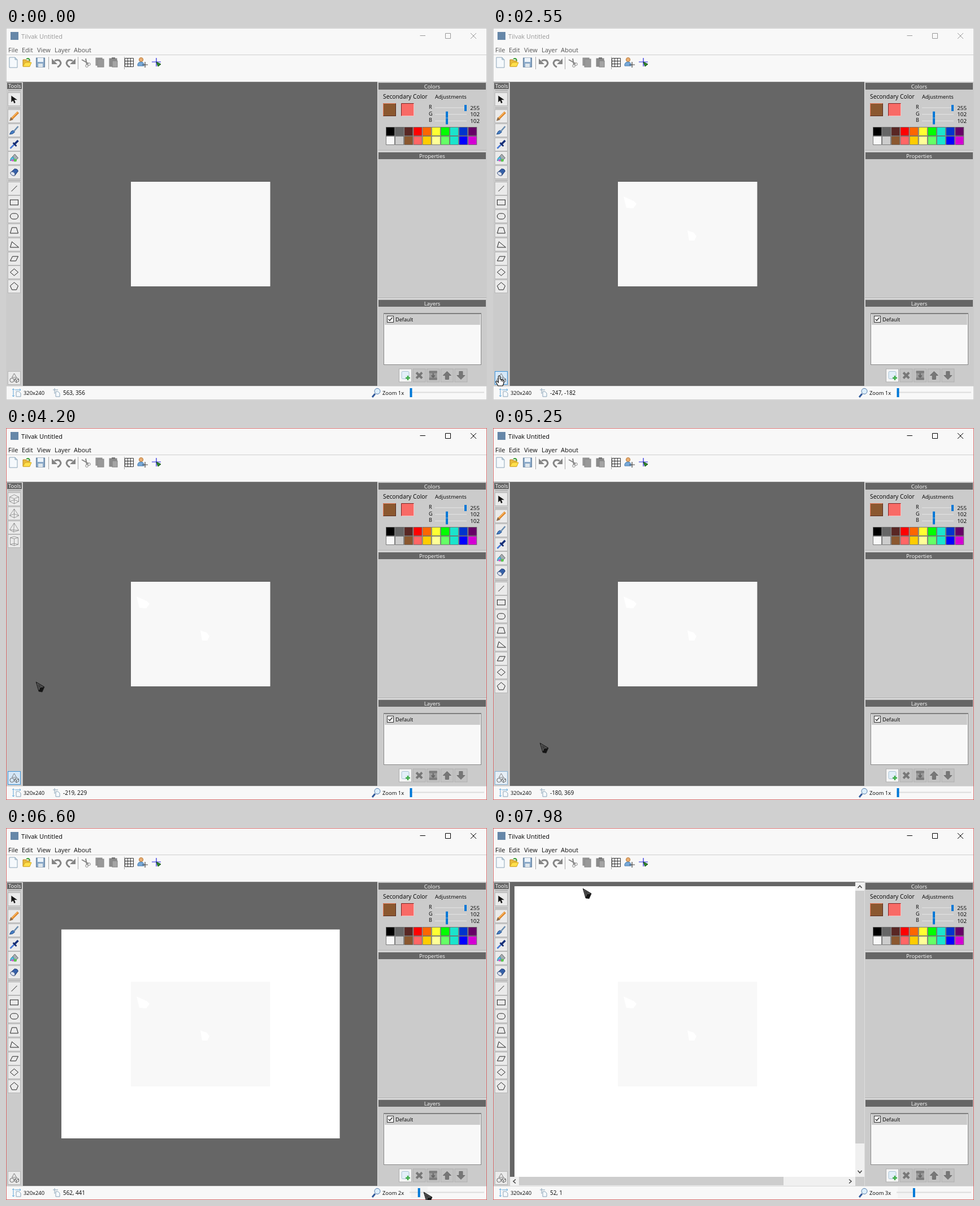
These frames come from a looping animation (851 by 658 pixels, 8 s). An HTML page:

```html
<!DOCTYPE html>
<html lang="en">
<head>
<meta charset="utf-8">
<title>Paint window</title>
<style>
html, body { margin: 0; width: 100%; height: 100%; overflow: hidden; background: #f8f8f8; }
svg { display: block; width: 851px; height: 658px; font-family: "Open Sans", "Noto Sans", sans-serif; }
text { white-space: pre; }
</style>
</head>
<body>
<svg id="stage" viewBox="0 0 851 658"></svg>
<script>
const R = (x, y, w, h, fill, stroke = 'none', extra = '') =>
  `<rect x="${x}" y="${y}" width="${w}" height="${h}" fill="${fill}" stroke="${stroke}" ${extra}/>`;
const P = (d, stroke = '#222', fill = 'none', w = 1) =>
  `<path d="${d}" stroke="${stroke}" fill="${fill}" stroke-width="${w}"/>`;
const C = (x, y, r, fill, stroke = 'none') =>
  `<circle cx="${x}" cy="${y}" r="${r}" fill="${fill}" stroke="${stroke}"/>`;
const T = (x, y, s, size = 9.5, fill = '#000', extra = '') =>
  `<text x="${x}" y="${y}" font-size="${size}" fill="${fill}" ${extra}>${s}</text>`;
const G = (x, y, body, extra = '') => `<g transform="translate(${x} ${y})" ${extra}>${body}</g>`;
const head = (y, s) => R(659, y, 190, 12, '#666') + T(754, y + 9.5, s, 9.5, '#fff', 'text-anchor="middle"');
const page = P('M-7-9H3L7-5V9H-7Z', '#8ba4b8', '#f5f9fc') + P('M3-9L7-5H3Z', '#8ba4b8', '#cfe0ec');
const grey = '#858585';

// Icons are drawn around their own centre
const bar = [
  [13, page],
  [37, P('M-7 7V-5H-2L0-3H5V7Z', '#b98a20', '#e9b93c') + P('M-7 7L-3 0H8L5 7Z', '#d9ac20', '#ffe04c') + P('M-1-6Q4-9 5-3', '#389b30', 'none', 2)],
  [61, R(-7.5, -8, 15, 16, '#8ba9c8', '#5f7b98') + R(-5, -8, 10, 7, '#eef4fa') + R(-4, 2, 8, 6, '#dfe6ec')],
  [90, P('M-4-3Q5-7 7 1Q6 6 1 8', grey, 'none', 3) + P('M-9-7V3H1Z', 'none', grey)],
  [114, P('M4-3Q-5-7-7 1Q-6 6-1 8', grey, 'none', 3) + P('M9-7V3H-1Z', 'none', grey)],
  [142, P('M-8-5L4 2M-1-7L1 4', grey, 'none', 2) + C(5, 3, 2.3, 'none', grey) + C(1, 6, 2.3, 'none', grey)],
  [166, R(-7, -8, 11, 13, '#9a9a9a', '#858585') + R(-4, -6, 11, 14, '#999', '#858585')],
  [190, R(-7, -7, 13, 14, '#8c8c8c', '#808080') + R(-3, -9, 6, 3, '#777') + R(-2, -3, 9, 11, '#a5a5a5', '#808080')],
  [218, P('M-7.5-7.5H7.5V7.5H-7.5ZM-2.5-7.5V7.5M2.5-7.5V7.5M-7.5-2.5H7.5M-7.5 2.5H7.5', '#333', '#fff')],
  [240, C(-1, -5, 3.6, '#e8ad72', '#b87838') + P('M-7 6V3Q-6-1-1-1Q3-1 4 3V6Z', '#4a7fb0', '#78a9d8') + P('M6-1V9M1 4H11', '#444', 'none', 1.2)],
  [266, P('M-8-1H8M0-8V7', '#2222e0', 'none', 1.2) + P('M0-1L8 3L3 7Z', '#174d17', '#2c8a2c')]
];
const line = d => P(d, '#222');
const pen = (tip, body) => P('M-8 8L-6 2L-2 6Z', tip, tip, .5) + P('M-4 4L7-7', body, 'none', 4);
const flat = [
  [126, P('M-5-6V5L-2 2L0 7L2 6L0 1H5Z', '#111', '#111', .3)],
  [156, pen('#8a6a48', '#d9822b') + P('M-4 3L6-7', '#ffbd62', 'none', 1.5)],
  [181, P('M-8 7Q-6 1-2 0L1 3Q-2 7-8 7Z', '#244e86', '#487fc4') + P('M0 1L7-7', '#6a8cae', 'none', 2.6)],
  [206, P('M-7 7L2-2', '#4877d4', 'none', 2.5) + P('M-2-3L4 3', '#13296b', 'none', 2.5) + P('M1-1L7-7', '#16307a', 'none', 3.6)],
  [230, P('M-5 0L1-7L7 0L0 6Z', '#666', '#a7adb2') + P('M-7 5Q-6-2-2-2L0 2Q-3 3-7 5Z', '#38a', '#55c5de') + C(-3, 4, 2, '#d457cf') + C(2, 4, 2.5, '#5bc64e')],
  [255, P('M-7 1L1-6Q6-6 7-2L1 6Q-5 7-7 1Z', '#233c72', '#3560a8') + P('M-7 1Q-5-2-1 0Q2 2 1 6Q-5 7-7 1Z', '#5d6f91', '#dfe5f2')],
  [284, line('M-5 5L5-5')],
  [308, R(-7, -4, 14, 9, 'none', '#222')],
  [333, R(-7, -5, 14, 10, 'none', '#222', 'rx="5"')],
  [358, line('M-7 5L-4-5H4L7 5Z')],
  [383, line('M-7 5L-4-5L8 5Z')],
  [408, line('M-7 4L-3-4H7L3 4Z')],
  [432, line('M0-6L7 0L0 6L-7 0Z')],
  [457, line('M0-7L7-1L4 6H-4L-7-1Z')]
];
const thin = d => P(d, '#777', 'none', .7);
const solid = [
  [126, thin('M-8-4L0-8L8-4V4L0 8L-8 4ZM-8-4L0-1L8-4M0-1V8M-8 4L0 1L8 4')],
  [151, thin('M0-8L8 4L0 8L-8 4ZM0-8V8M-8 4L0 1L8 4')],
  [176, thin('M0-8L8 5L-1 8L-8 4ZM0-8L-1 8M-8 4L8 5')],
  [200, thin('M-7-6L0-4L7-6V6L0 8L-7 6ZM-7-6L0-8L7-6M0-4V8M-7 6L0 4L7 6')]
];
const plain = '#eaeaea';
const button = ([y, icon]) => R(3.5, y - 11.5, 22, 23, plain, '#b8b8b8', `class="tool" data-y="${y}"`) + G(14.5, y, icon);
const swatches = [
  '#000 #666 #592724 #f00 #f60 #ff3 #0f0 #1be4cc #03c #606',
  '#f8f8f8 #ccc #8b5830 #f66 #fc0 #ff9 #6f6 #1be4cc #00f #d400d4'
].map((row, j) => row.split(' ').map((c, i) =>
  R(672.5 + i * 16.15, 175.5 + j * 16, 15, 15, c, '#666', 'stroke-width=".8"')).join('')).join('');
const level = ([name, value, x], i) => {
  const y = 140.5 + i * 11.7;
  return T(748, y + 2.5, name, 9) + R(759, y, 56, 1, '#e5e5e5') + R(x - 2, y - 4.5, 4, 11, '#0078d7')
    + T(838, y + 4, value, 9.8, '#000', 'text-anchor="end"');
};
const arrowUp = 'M0-7L7 0H3V7H-3V0H-7Z';
const layerIcons = [
  R(-6.5, -7, 13, 13, '#e3eff8', '#a9c4d6', 'rx="2"') + P('M4.5 .5V8.5M.5 4.5H8.5', '#3fae48', 'none', 2.6),
  P('M-5-5L5 5M5-5L-5 5', '#777', 'none', 4),
  R(-7, -8, 14, 16, '#999') + R(-7, -8, 14, 4, '#7c7c7c') + R(-7, 4, 14, 4, '#7c7c7c') + P('M0-4V3M-3 0L0 3L3 0', '#666', 'none', 2),
  P(arrowUp, '#6c6c6c', '#777'),
  P('M0 7L7 0H3V-7H-3V0H-7Z', '#6c6c6c', '#777')
].map((icon, i) => R(695.5 + i * 24.6, 603, 22, 23, i ? '#c3c3c3' : '#f5f5f5', '#b0b0b0') + G(706.5 + i * 24.6, 614.5, icon)).join('');
const chevron = (x, y, turn) => `<path transform="translate(${x} ${y}) rotate(${turn})" d="M-3.5 2L0-2L3.5 2" fill="none" stroke="#444" stroke-width="1.5"/>`;
const ghost = (x, y, id, d) => G(x, y, P(d, 'none', '#fff'), `id="${id}"`);

const stage = document.getElementById('stage');
stage.innerHTML =
  R(0, 0, 851, 658, '#f8f8f8')
  + R(8, 7, 14, 14, '#6687a8')
  + '<g id="title">' + T(27, 18.5, 'Tilvak Untitled', 11, 'currentColor')
  + P('M732.5 13.5H742M777.5 9.5H786.5V18.5H777.5ZM822 9L832 19M832 9L822 19', 'currentColor') + '</g>'
  + '<g id="menu">' + [[4, 'File'], [28, 'Edit'], [55, 'View'], [86, 'Layer'], [120, 'About']].map(([x, s]) => T(x, 42.5, s, 11, 'currentColor')).join('') + '</g>'
  + R(0, 47, 851, 1, '#cfcfcf') + [75, 127, 209].map(x => R(x, 51, 1, 22, '#aaa')).join('')
  + bar.map(([x, icon]) => G(x, 61, icon)).join('')
  // drawing area
  + R(29.5, 95, 628.5, 538, '#666') + R(221, 272, 246, 185, '#fff', 'none', 'id="sheet"') + R(221, 272, 246.3, 185, '#f8f8f8')
  + ghost(344, 358, 'mark1', 'M0 0L11 4L16 10L12 18L3 18Z')
  + ghost(231, 298, 'mark2', 'M0 0L18 8L23 13L17 21L5 20Z')
  + '<g id="scroll">' + R(641, 96, 16, 521, '#f0f0f0') + R(641, 111, 16, 447, '#cdcdcd')
  + R(30, 617, 612, 16, '#f0f0f0') + R(46, 617, 468, 15, '#cdcdcd') + R(641, 617, 16, 16, '#cbcbcb')
  + chevron(649, 104, 0) + chevron(649, 608, 180) + chevron(38, 625, -90) + chevron(632, 625, 90) + '</g>'
  // left tools
  + R(0, 95, 29.5, 538, '#cbcbcb') + R(28, 95, 1, 538, '#dedede') + R(0, 95, 658, 1, '#888')
  + R(2, 97, 26, 11, '#666') + T(4, 106, 'Tools', 9.3, '#fff') + R(4, 110, 22, 1, '#aaa')
  + '<g id="flat">' + flat.map(button).join('') + R(4, 141, 22, 1, '#aaa') + R(4, 269, 22, 1, '#aaa') + '</g>'
  + '<g id="solid">' + solid.map(button).join('') + '</g>'
  + R(3.5, 607.5, 22, 23, plain, '#b8b8b8', 'id="swap"')
  + G(14.5, 619, P('M0-8L4-1H-4Z', '#666', 'none', .8) + C(-4, 4, 3.6, 'none', '#666') + P('M1 2L5 0L8 2V6L4 8L1 6ZM1 2L4 4L8 2M4 4V8', '#555', 'none', .9))
  // right panels
  + R(658, 95, 193, 538, '#cbcbcb') + R(657, 95, 1, 538, '#dedede')
  + head(97, 'Colors') + head(220, 'Properties') + head(481, 'Layers')
  + [217, 478].map(y => R(658, y - 1, 192, 1, '#aaa') + R(658, y, 192, 1, '#eee')).join('')
  + T(667, 125, 'Secondary Color', 10.3) + T(759, 125, 'Adjustments', 9.5)
  + R(667.5, 133.5, 22, 22, '#8b5830', '#5a2c20') + P('M667.5 155.5V133.5H689.5', '#e57c5c')
  + R(699.5, 133.5, 22, 22, '#f86a66', '#fbb') + P('M699.5 155.5V133.5H721.5', '#7d2020')
  + [['R', 255, 813], ['G', 102, 780], ['B', 102, 780]].map(level).join('') + swatches
  + R(668.5, 504.5, 172, 91, '#f8f8f8', '#888') + R(670, 506, 169, 19, '#cbcbcb') + P('M669 505.5H840', '#777')
  + R(674.5, 509.5, 11, 11, '#fff', '#333') + P('M676.5 515L679 517.5L683.5 512', '#222', 'none', 1.3) + T(689, 518.5, 'Default', 9.2) + layerIcons
  // status bar
  + R(0, 633, 851, 25, '#f8f8f8') + R(0, 633, 851, 1, '#d8d8d8')
  + G(19, 645, P('M-6-7V7M-8-5L-6-7L-4-5M-8 5L-6 7L-4 5M-3-5H7M5-7L7-5L5-3', '#5aa4da') + P('M-1-2H4L7 1V7H-1Z', '#8ba4b8', '#f5f9fc'))
  + T(31, 648.5, '320x240', 9.4)
  + G(89, 645, P('M-6-5H3M-3-8V2', '#8ba4b8') + P('M-1-2H3L6 1V7H-1Z', '#8ba4b8', '#f5f9fc'))
  + T(101, 648.5, '', 9.9, '#000', 'id="coords"')
  + P('M648 653L653 647', '#315a9c', 'none', 3) + C(657, 642.5, 5, '#dceefb', '#527bab')
  + T(666, 648.5, '', 9.4, '#000', 'id="zoom"')
  + R(716, 635, 30, 20, '#f3f3f3', 'none', 'id="smear"') + R(714, 643.5, 132, 2, '#ddd') + R(714.5, 637, 4, 16, '#0078d7', 'none', 'id="thumb"')
  + R(.5, .5, 850, 657, 'none', '#ccc', 'id="frame"')
  + '<g id="arrow">' + P('M0 0L15 9L11 18L5 17Z', '#222', '#151515', .8) + P('M2 2.5L12.5 9L7 9.5L5.5 14Z', '#888', '#3c3c3c', .6) + '</g>'
  + '<g id="hand">' + P('M-1.5 10V1Q0-1 1.5 1V6L8 8Q9 13 6 18H-2L-6 11Q-5 8-1.5 12Z', '#111', '#fff', 1.2) + P('M3.5 7V10M5.8 8V11', '#111') + '</g>';

// Pointer path: step, x, y
const path = [
  [1, 344, 358], [2, 238, 302], [3, 231, 298], [5, 31, 132], [7, 18, 119], [8, 16, 125],
  [9, 15, 205], [11, 13, 300], [14, 12, 570], [17, 11, 614], [19, 11, 612], [21, 16, 300],
  [23, 14, 122], [25, 14, 200], [28, 53, 448], [30, 40, 520], [32, 12, 614], [33, 12, 614],
  [35, 83, 556], [36, 412, 570], [39, 653, 611], [41, 716, 640], [43, 739, 643],
  [49, 739, 643], [50, 640, 560], [53, 159, 106]
];
function pos(k) {
  const i = path.findIndex(p => p[0] >= k);
  if (i < 0) return path[path.length - 1].slice(1);
  const b = path[i], a = path[Math.max(0, i - 1)];
  const u = b === a ? 0 : (k - a[0]) / (b[0] - a[0]);
  return [a[1] + (b[1] - a[1]) * u, a[2] + (b[2] - a[2]) * u];
}
const origins = [[221, 272], [98, 179.5], [38, 103]];
function coords(k) {
  for (let j = k; j > 0; j--) {
    const [x, y] = pos(j);
    if (x <= 30 || x >= 657 || y <= 95 || y >= 633) continue;
    const z = j < 44 ? 1 : j < 48 ? 2 : 3, [ox, oy] = origins[z - 1], s = .76875 * z;
    return Math.round((x - ox) / s) + ', ' + Math.round((y - oy) / s);
  }
  return '563, 356';
}

const $ = id => document.getElementById(id);
const show = (id, on) => { $(id).style.display = on ? '' : 'none'; };
const set = (el, attrs) => { for (const n in attrs) el.setAttribute(n, attrs[n]); };
const tools = [...document.querySelectorAll('.tool')];
const tint = (el, on) => set(el, { fill: on ? '#d5e7f7' : plain, stroke: on ? '#3b93da' : '#b8b8b8' });

function draw(t) {
  const k = Math.floor(t < 7000 ? (t + 10) / 150 : (t - 20) / 150);
  const z = t < 6600 ? 1 : t < 7100 ? 2 : 3;
  const active = k >= 18, in3d = k >= 18 && k < 33;
  const [x, y] = pos(k), before = pos(k - 2)[1];
  const hand = x < 29 && k > 7;

  $('title').style.color = active ? '#000' : '#999';
  $('menu').style.color = active ? '#111' : '#555';
  set($('frame'), { stroke: active ? '#d66b6b' : '#ccc' });
  show('flat', !in3d);
  show('solid', in3d);
  const lo = Math.min(y, before) + 10, hi = Math.max(y, before) - 10;
  tools.forEach(b => tint(b, hand && b.dataset.y > lo && b.dataset.y < hi));
  tint($('swap'), in3d || hand && y > 600);
  if (k > 33 && k < 37) set($('swap'), { fill: '#e6eef5', stroke: '#8ab4d6' });

  const [ox, oy] = origins[z - 1];
  set($('sheet'), { x: ox, y: oy, width: z > 2 ? 603 : 246.25 * z, height: z > 2 ? 514 : 184.75 * z });
  show('scroll', z > 2);
  show('mark1', k > 1);
  show('mark2', k > 3);
  show('smear', z > 1);
  $('zoom').textContent = `Zoom ${z}x`;
  $('coords').textContent = coords(k);
  set($('thumb'), { x: 714.5 + 14.2 * (z - 1) });

  show('arrow', k > 0 && !hand);
  show('hand', hand);
  set($(hand ? 'hand' : 'arrow'), { transform: `translate(${x} ${y + 1})` });
}
function tick(now) {
  draw(now % 8000);
  requestAnimationFrame(tick);
}
draw(0);
requestAnimationFrame(tick);
</script>
</body>
</html>
```
